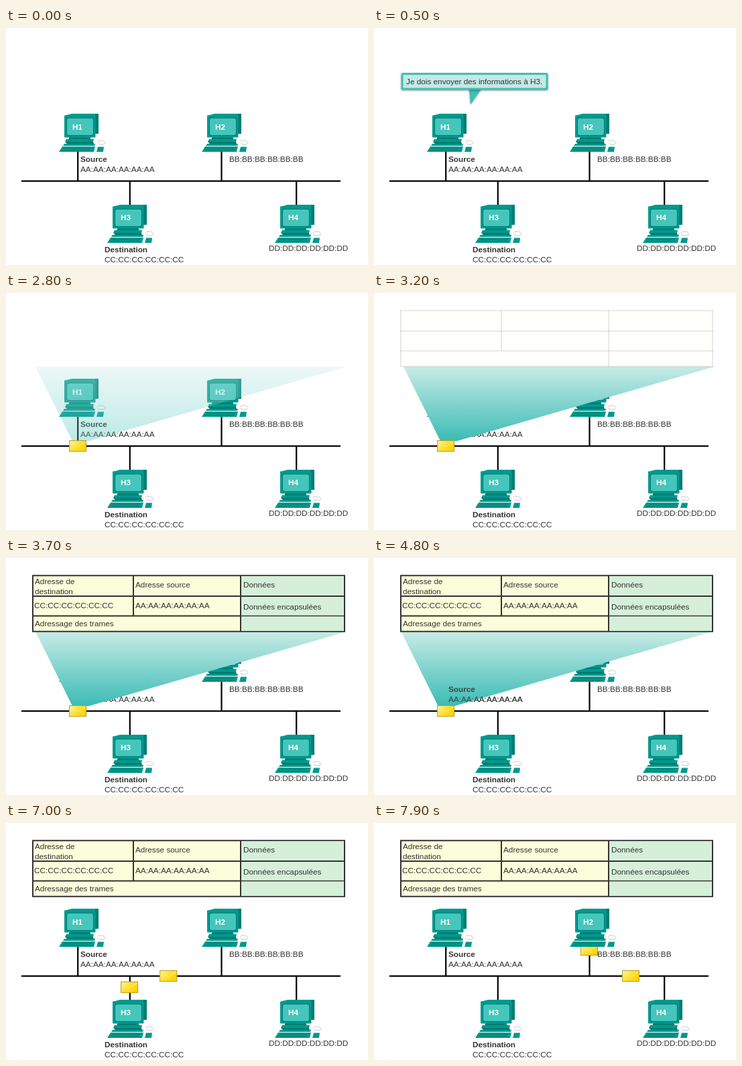
Recreate the animation shown at these times as an HTML page with a canvas. Size 540 by 354 pixels, loop 8000 ms.

```html
<!DOCTYPE html>
<html lang="fr">
<head>
<meta charset="utf-8">
<style>
  html, body { margin: 0; width: 100%; height: 100%; overflow: hidden; background: #fff; }
  canvas { display: block; }
</style>
</head>
<body>
<canvas id="stage" width="540" height="354"></canvas>
<script>
const ctx = document.getElementById('stage').getContext('2d');
const LOOP = 8000, STEP = 100, BUS = 228.7;
const DARK = '#007d72', TEAL = '#00998d', LIGHT = '#45c5bb', INK = '#333';
const HOSTS = [
  { name: 'H1', x: 79, y: 128, wire: 107.2 },
  { name: 'H2', x: 292, y: 128, wire: 321.5 },
  { name: 'H3', x: 151, y: 264, wire: 184.8 },
  { name: 'H4', x: 401, y: 264, wire: 433.2 },
];
const COLS = [40, 190, 350, 505], ROWS = [26.3, 57, 86.5, 109.8];
const address = letter => Array(6).fill(letter + letter).join(':');

const progress = (t, from, to) => Math.min(1, Math.max(0, (t - from) / (to - from)));
const lerp = (a, b, k) => a + (b - a) * k;
const softEase = k => (k + (1 - Math.cos(Math.PI * k)) / 2) / 2;

function text(str, x, y, weight = 'normal', color = INK) {
  ctx.font = `${weight} 11.78px "Liberation Sans", Arial, sans-serif`;
  ctx.fillStyle = color;
  ctx.fillText(str, x, y);
}

function rect(fill, x, y, w, h, r = 0) {
  ctx.beginPath();
  ctx.roundRect(x, y, w, h, r);
  ctx.fillStyle = fill;
  ctx.fill();
}

// Quadrilateral with level top (x1..x2) and bottom (x3..x4) edges
function slab(fill, top, x1, x2, bottom, x3, x4) {
  ctx.beginPath();
  ctx.moveTo(x1, top);
  ctx.lineTo(x2, top);
  ctx.lineTo(x4, bottom);
  ctx.lineTo(x3, bottom);
  ctx.fillStyle = fill;
  ctx.fill();
}

function line(color, width, x1, y1, x2, y2) {
  ctx.beginPath();
  ctx.moveTo(x1, y1);
  ctx.lineTo(x2, y2);
  ctx.strokeStyle = color;
  ctx.lineWidth = width;
  ctx.stroke();
}

function faded(alpha, draw) {
  if (alpha <= 0) return;
  ctx.save();
  ctx.globalAlpha = alpha;
  draw();
  ctx.restore();
}

function computer({ name, x, y }) {
  ctx.save();
  ctx.translate(x, y);
  // mouse and cord
  ctx.beginPath();
  ctx.ellipse(63, 43, 6, 3, .1, Math.PI, Math.PI * 2.8);
  ctx.strokeStyle = '#c3ccd0';
  ctx.lineWidth = 1;
  ctx.stroke();
  slab(TEAL, 49.5, 58, 67, 57, 56, 66);
  // stand, base and keyboard
  slab(DARK, 34, 16, 46, 39, 14, 48);
  slab(TEAL, 38, 11, 52, 42, 9, 51);
  slab(DARK, 42, 9, 51, 45, 12, 52);
  slab(TEAL, 45, 8, 54, 48, 6, 53);
  slab(TEAL, 49, 5, 54, 57, 0, 52);
  for (let row = 0; row < 2; row++) line(DARK, 1.2, 7 - row * 2, 51.5 + row * 3, 49 - row, 51.5 + row * 3);
  // monitor
  slab(TEAL, 0, 19, 59, 3, 8, 54);
  slab(DARK, 0, 54, 59, 30, 54, 59);
  rect(TEAL, 8, 2.5, 46.5, 33, 1);
  rect(DARK, 11, 6, 41, 27, 3);
  rect(LIGHT, 12, 7, 39, 25, 3);
  text(name, 20, y > BUS ? 23 : 24, 'bold', '#fff');
  ctx.restore();
}

function envelope(x, y) {
  const gold = ctx.createLinearGradient(x + 2, y, x + 20, y + 17);
  gold.addColorStop(0, '#fff0a0');
  gold.addColorStop(.55, '#ffe02e');
  gold.addColorStop(1, '#f9d300');
  rect(gold, x, y, 26, 17);
  for (const side of [1, 25]) line('#ffeb8c', 1, x + side, y + 2, x + 13, y + 10);
  ctx.strokeStyle = '#b99d28';
  ctx.strokeRect(x + .5, y + .5, 25, 16);
}

function sourceLabel() {
  text('Source', 111, 200, 'bold');
  text(address('A'), 111, 215);
}

function bubble() {
  ctx.save();
  ctx.shadowColor = 'rgba(0,0,0,.4)';
  ctx.shadowBlur = 3;
  ctx.shadowOffsetY = 1;
  slab('#3fbfb6', 91, 142, 160, 114, 144, 144);
  rect('#3fbfb6', 40.5, 67, 219, 25.5, 2);
  ctx.restore();
  rect('#c4e9e5', 43.5, 70, 213, 19.5);
  text('Je dois envoyer des informations à H3.', 48, 84);
}

function cone(shift) {
  const teal = ctx.createLinearGradient(0, 110, 0, 221);
  teal.addColorStop(0, '#c8ebe6');
  teal.addColorStop(1, '#3bbcb5');
  slab(teal, 110, 40 + shift, 504 + shift, 221, 95 + shift, 120 + shift);
}

function tableGrid() {
  const [left, , data, right] = COLS, [top, , last, bottom] = ROWS;
  rect('#fcfddb', left, top, right - left, bottom - top);
  ROWS.forEach(y => line(INK, 2, left - 1, y, right + 1, y));
  COLS.forEach((x, i) => line(INK, 2, x, top, x, i === 1 ? last : bottom));
}

function tableContent() {
  for (let i = 0; i < 3; i++) rect('#d5efd9', COLS[2] + 1, ROWS[i] + 1, 153, ROWS[i + 1] - ROWS[i] - 2);
  text('Adresse de', 43, 39);
  text('destination', 43, 54);
  text('Adresse source', 193, 44);
  text('Données', 354, 44);
  text(address('C'), 42, 75);
  text(address('A'), 193, 75);
  text('Données encapsulées', 354, 77);
  text('Adressage des trames', 43, 102);
}

function mainEnvelope(t) {
  if (t < 1500) return;
  if (t < 6000) {
    const x = lerp(107, 94, progress(t, 1500, 1900));
    envelope(x, lerp(142, 220, softEase(progress(t, 1500, 2500))));
  } else {
    const toH3 = lerp(110, 171, progress(t, 6000, 6700));
    const toH2 = 137 * softEase(progress(t, 6700, 7380));
    envelope(toH3 + toH2 + Math.max(0, t - 7500) * .155, 220);
  }
}

function draw(t) {
  rect('#fff', 0, 0, 540, 354);
  line('#000', 2.2, 23, BUS, 499, BUS);
  HOSTS.forEach(({ wire, y }) => line('#000', 2.2, wire, y > BUS ? y + 2 : y + 56, wire, BUS));
  // copies sent down to H3 and up to H2
  if (t > 6700) envelope(171, Math.min(272, 220 + (t - 6700) * .056));
  if (t > 7500) envelope(308, 220 - (t - 7500) * .0975);
  HOSTS.forEach(computer);
  sourceLabel();
  text(address('B'), 333, 200);
  text('Destination', 147, 335, 'bold');
  text(address('C'), 147, 350);
  text(address('D'), 392, 333);

  if (t >= 500 && t < 2700) bubble();
  if (t < 4900) {
    const reveal = progress(t, 4100, 4900);
    faded(progress(t, 2600, 3200), () => cone(lerp(4, 0, reveal)));
    faded(reveal, sourceLabel);
  }
  faded(progress(t, 3140, 3700), tableGrid);
  faded(progress(t, 3200, 3700), tableContent);
  mainEnvelope(t);
}

function tick() {
  const t = performance.now() % LOOP;
  draw(Math.floor(t / STEP) * STEP);
  requestAnimationFrame(tick);
}
tick();
</script>
</body>
</html>
```
